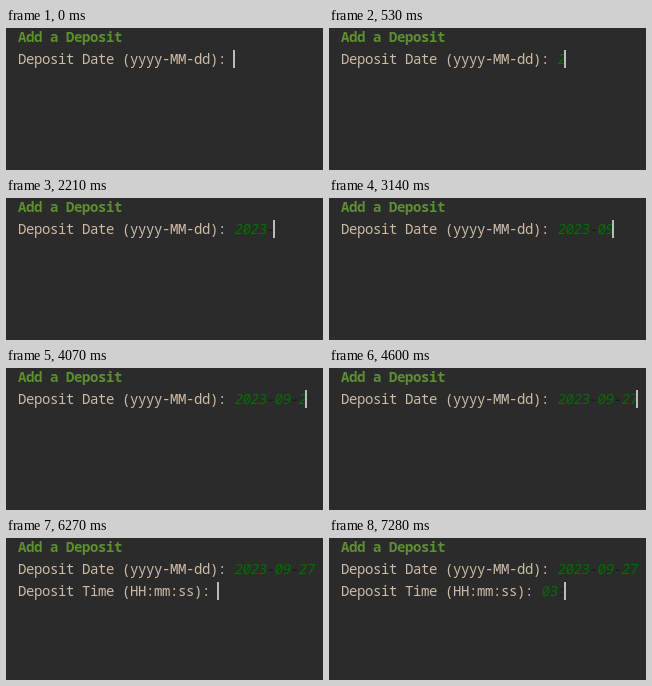
These frames come from a looping animation (317 px wide and 142 px high, 8 s). An HTML page:

```html
<!DOCTYPE html>
<html lang="en">
<head>
<meta charset="utf-8">
<title>Add a Deposit</title>
<style>
  html, body { margin: 0; width: 100%; height: 100%; overflow: hidden; background: #2b2b2b; }
  svg { display: block; width: 317px; height: 142px; }
  text { font: 500 14px "Noto Sans Mono", "DejaVu Sans Mono", monospace; letter-spacing: -.4px; fill: #cdbba7; white-space: pre; }
  .title { font-weight: 700; fill: #5c9030; }
  .typed { fill: #007000; }
  .mark { fill: #101c0c; }
</style>
</head>
<body>
<svg viewBox="0 0 317 142">
  <text class="title" x="12" y="14">Add a Deposit</text>
  <text x="12" y="36">Deposit Date (yyyy-MM-dd): </text>
  <text id="timePrompt" x="12" y="58">Deposit Time (HH:mm:ss): </text>
  <text id="date" class="typed" transform="translate(228 36) skewX(-9)"></text>
  <text id="time" class="typed" transform="translate(212 58) skewX(-9)"></text>
  <rect id="caret" width="2" height="18" fill="#bbb"/>
</svg>
<script>
const LOOP = 8000, CELL = 8, ENTER = 5060;
const $ = id => document.getElementById(id);

const fields = {
  date: { x: 227, y: 22, text: "2023-09-27", keys: [530, 800, 1200, 1530, 2210, 2810, 3140, 3670, 4070, 4600] },
  time: { x: 211, y: 44, text: "03:", keys: [6400, 6670, 7280] }
};
const caretOff = [[270, 530], [2740, 2810], [5740, 6270]];

function type(id, t) {
  const f = fields[id];
  const count = f.keys.filter(k => k <= t).length;
  if (f.count !== count) {
    f.count = count;
    $(id).innerHTML = f.text.slice(0, count).replace(/[-:]/g, '<tspan class="mark">$&</tspan>');
  }
}

function show(element, on) {
  element.setAttribute("visibility", on ? "visible" : "hidden");
}

function draw(now) {
  const t = now % LOOP;
  type("date", t);
  type("time", t);
  show($("timePrompt"), t >= ENTER);

  const f = t < ENTER ? fields.date : fields.time;
  $("caret").setAttribute("x", f.x + f.count * CELL);
  $("caret").setAttribute("y", f.y);
  show($("caret"), !caretOff.some(([from, to]) => t >= from && t < to));
  requestAnimationFrame(draw);
}
draw(performance.now());
</script>
</body>
</html>
```
